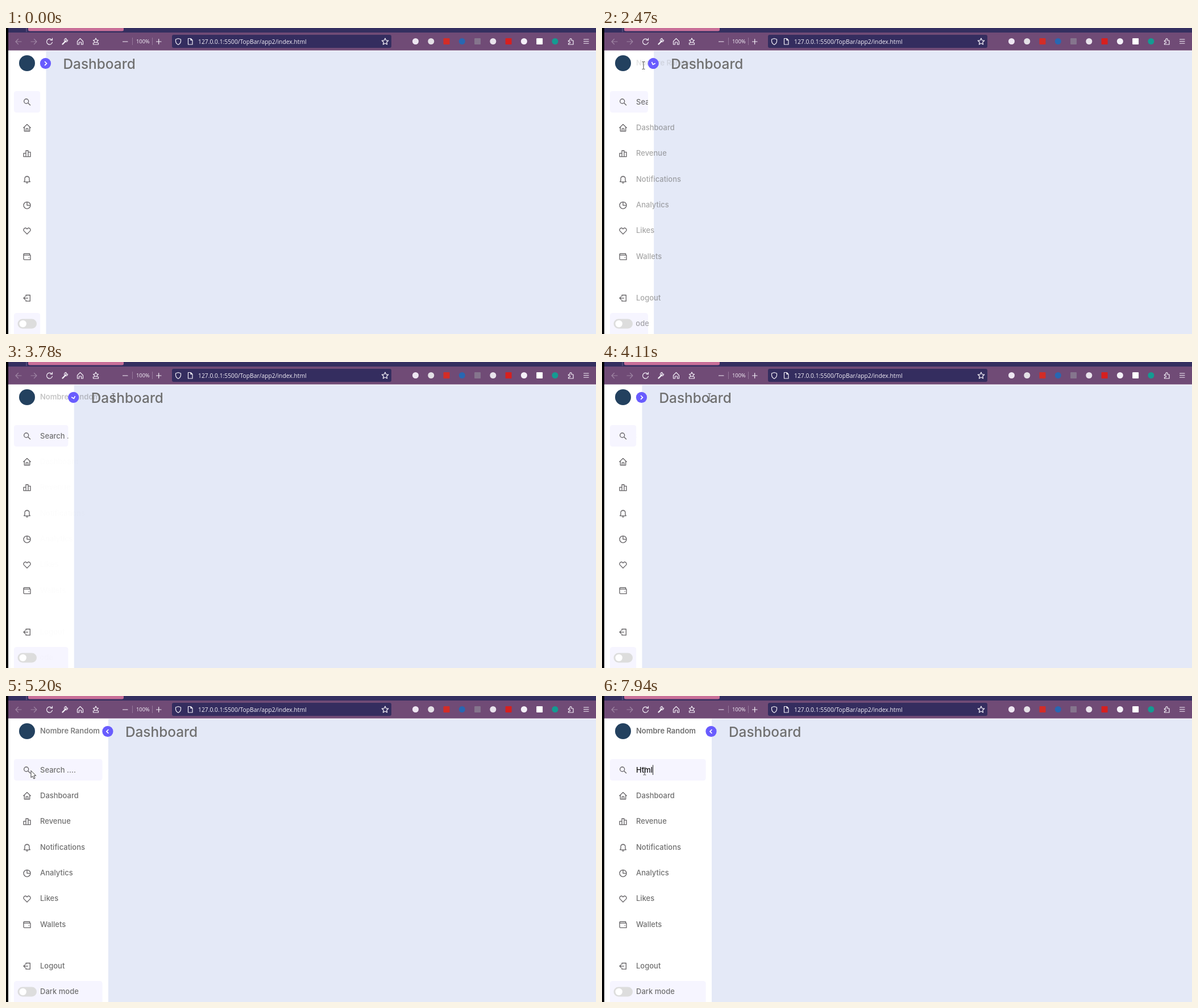
An HTML page that plays this animation: 1038 px wide and 539 px high, repeating every 8 s.

```html
<!DOCTYPE html>
<html lang="en">
<head>
<meta charset="utf-8">
<title>Collapsing sidebar</title>
<style>
  html, body { margin: 0; width: 100%; height: 100%; overflow: hidden; background: #e4e9f7; }
  svg { display: block; width: 100%; height: 100%; }
  text { font: 500 13px Inter, sans-serif; fill: #707070; white-space: pre; }
  .title { font-size: 24.4px; }
  .name { font-weight: 600; }
  .chrome text { font: 10.3px "Open Sans", sans-serif; fill: #f4f0f8; }
  .line { fill: none; stroke: #f4f0f8; stroke-width: 1.2; stroke-linecap: round; stroke-linejoin: round; }
  .dim { opacity: .35; }
  .icon { fill: none; stroke: #656366; stroke-width: 2; stroke-linejoin: round; }
  .box { fill: #f6f5ff; }
</style>
</head>
<body>
<svg viewBox="0 0 1038 539" preserveAspectRatio="none">
  <defs>
    <clipPath id="searchClip"><rect id="searchArea" x="60" y="111" height="38"/></clipPath>
    <clipPath id="modeClip"><rect x="59.5" y="502" width="200" height="37"/></clipPath>
  </defs>

  <rect y="39" width="1038" height="2" fill="#f5f6fc"/>
  <text id="title" class="title" y="71.5">Dashboard</text>

  <rect id="sidebar" x="4" y="39" height="500" fill="#fff"/>
  <rect id="searchBox" class="box" x="14" y="111" height="38" rx="4.5"/>
  <rect id="modeBox" class="box" x="14" y="502" height="45" rx="4.5"/>
  <circle cx="37" cy="62" r="14" fill="#23415f"/>
  <text id="name" class="name" x="60" y="66.3">Nombre Random</text>
  <g id="menu"></g>
  <g clip-path="url(#searchClip)">
    <text id="search" x="60" y="134.5"></text>
    <rect id="caret" y="121.5" width="1" height="17.5" fill="#222"/>
  </g>
  <g clip-path="url(#modeClip)"><text id="mode" y="524.8">Dark mode</text></g>
  <rect x="20.5" y="512.5" width="33.5" height="17" rx="8.5" fill="#ddd"/>
  <circle cx="29.7" cy="521" r="6.2" fill="#fff"/>
  <g id="toggle">
    <circle r="9.6" fill="#695cfe"/>
    <path d="M-1.4-3.4 2-0 -1.4 3.4" fill="none" stroke="#fff" stroke-width="1.7"/>
  </g>

  <g class="chrome">
    <rect width="1038" height="8" fill="#342f60"/>
    <path d="M39 0H207V3Q207 5.5 204 5.5H42Q39 5.5 39 3Z" fill="#c96f98"/>
    <path d="M36 0V7" stroke="#6a6590"/>
    <rect y="8" width="1038" height="31.5" fill="#704b76"/>
    <rect x="292" y="12" width="386" height="23" rx="3" fill="#342d5f"/>
    <g class="line dim">
      <path d="M27 24H17M21.500 19.500 17 24 21.500 28.500"/>
      <path d="M44 24H54M49.500 19.500 54 24 49.500 28.500"/>
    </g>
    <g class="line">
      <path d="M80.500 21A5 5 0 1 0 81.500 25M81.500 18V21.500H78"/>
      <path d="M99.500 28.500 105 23" stroke-width="2.4"/>
      <path d="M108.500 21A3 3 0 1 1 106 18.500L105.500 21.500Z"/>
      <path d="M125.500 23.500 130.500 18.500 135.500 23.500V29H132.500V25H128.500V29H125.500Z"/>
      <path d="M158 18 159.500 21 162.500 21.500 160.300 23.700 160.800 26 158 25 155.200 26 155.700 23.700 153.500 21.500 156.500 21ZM153.500 26V29H162.500V26"/>
      <path d="M205.500 24H214M264.500 24H273M268.700 19.700V28.300"/>
      <path d="M303 18.500 307.500 20V23Q307.500 27 303 29.500 298.500 27 298.500 23V20Z"/>
      <path d="M320.500 18.500H325L328 21.500V29H320.500ZM325 18.500V21.500H328"/>
      <path d="M667 18 668.700 21.800 672.700 22.200 669.700 25 670.600 29 667 27 663.400 29 664.300 25 661.300 22.200 665.300 21.800Z"/>
      <path d="M989.500 22H992V20A1.500 1.500 0 0 1 995 20V22H998V29H989.500V27H991A1.500 1.500 0 0 0 991 24H989.500Z"/>
      <path d="M1016.500 20H1025M1016.500 23.500H1025M1016.500 27H1025"/>
    </g>
    <path d="M222.500 17V30M257.500 17V30" stroke="#94779b"/>
    <text x="229" y="27.300" style="font-size:9.4px">100%</text>
    <text x="338" y="27.700">127.0.0.1:5500/TopBar/app2/index.html</text>
    <g id="addons"></g>
  </g>
  <rect width="4" height="539"/>

  <path id="arrow" d="M0 0V12.200L2.800 9.600 4.900 14.300 7 13.400 5 8.800H8.700Z" fill="#fff" stroke="#222" stroke-width=".9"/>
  <path id="beam" d="M-2.500-6.500H-.8L0-5.800.8-6.500H2.500M0-5.800V5.800M-2.500 6.500H-.8L0 5.800.8 6.500H2.500" fill="none" stroke="#4c4c4c"/>
</svg>
<script>
const LOOP = 8000;
const CLOSED = 70.5, OPEN = 193;
const $ = id => document.getElementById(id);
const set = (id, attrs) => {
  for (const key in attrs) $(id).setAttribute(key, attrs[key]);
};

// Icons use a 24-unit box.
const menuItems = [
  [130, '', 'M16 10A6 6 0 1 1 4 10 6 6 0 0 1 16 10M14.500 14.500 21 21'],
  [175.500, 'Dashboard', 'M2 12.500 12 3 22 12.500M5 10V21H19V10M9.500 21V14H14.500V21'],
  [221, 'Revenue', 'M3 11H9V20H3ZM9 4H15V20H9ZM15 8H21V20H15Z'],
  [266.500, 'Notifications', 'M4 18H20L18 15V10Q18 4 12 4T6 10V15ZM12 4V2M9.500 20Q12 23 14.500 20'],
  [312, 'Analytics', 'M12 3A9 9 0 1 0 21 12H12ZM12 3A9 9 0 0 1 21 12'],
  [357, 'Likes', 'M12 20.500 4 12.500C0 8 7 1 12 7C17 1 24 8 20 12.500Z'],
  [402.500, 'Wallets', 'M19 8V4H5Q3 4 3 6V18Q3 20 5 20H21V8H5Q3 8 3 6M16 14H18'],
  [475.500, 'Logout', 'M9 8V4H20V20H9V16M15 12H3M7 8 3 12 7 16']
];
$('menu').innerHTML = menuItems.map(([y, label, d]) =>
  `<path class="icon" d="${d}" transform="translate(29 ${y - 7.700}) scale(.667)"/>
   <text class="label" x="60" y="${y + 4}">${label}</text>`).join('');
const labels = [...document.querySelectorAll('.label'), $('mode')];

const addons = [
  ['circle', '#eee6f2'], ['circle', '#e4e0e6'], ['square', '#d32d27'],
  ['circle', '#2867b2'], ['square', '#85758d'], ['circle', '#e9e3ec'],
  ['square', '#d6201f'], ['circle', '#f4f0f8'], ['square', '#fff'], ['circle', '#149b92']
];
$('addons').innerHTML = addons.map(([shape, color], i) => {
  const radius = shape === 'circle' ? 5.500 : 1;
  return `<rect x="${715 + i * 27.270}" y="18" width="11" height="11" rx="${radius}" fill="${color}"/>`;
}).join('');

// The CSS "ease" curve: cubic-bezier(.25, .1, .25, 1).
function ease(x) {
  if (x <= 0) return 0;
  if (x >= 1) return 1;
  const bezier = (a, b, s) => 3 * a * s * (1 - s) ** 2 + 3 * b * s * s * (1 - s) + s ** 3;
  let low = 0, high = 1;
  for (let i = 0; i < 20; i++) {
    const mid = (low + high) / 2;
    if (bezier(.25, .25, mid) < x) low = mid; else high = mid;
  }
  return bezier(.1, 1, low);
}

const CLICKS = { open: 2400, close: 3608, reopen: 4895 };
function openness(t, duration) {
  if (t < CLICKS.close) return ease((t - CLICKS.open) / duration);
  if (t < CLICKS.reopen) return 1 - ease((t - CLICKS.close) / duration);
  return ease((t - CLICKS.reopen) / duration);
}

// time, x, y
const pointerPath = [
  [470, 974, 537], [1250, 336, 251], [1310, 334, 249], [1900, 55, 78], [2000, 62, 68],
  [2130, 68, 66], [2210, 71, 66], [2400, 71, 66], [2465, 73, 66], [2650, 73, 66],
  [3100, 191, 63], [3240, 191, 63], [3300, 192.500, 65], [3600, 191, 63], [3700, 189, 62],
  [4110, 189, 62], [4530, 44, 131.500], [5250, 44, 131.500], [5520, 74, 131],
  [5600, 74, 131], [5660, 76, 132], [5770, 76, 132], [5810, 75, 132.500], [LOOP, 75, 132.500]
];
function pointerAt(t) {
  const i = Math.max(1, pointerPath.findIndex(point => point[0] > t));
  const [t0, x0, y0] = pointerPath[i - 1], [t1, x1, y1] = pointerPath[i];
  const s = Math.max(0, (t - t0) / (t1 - t0)), k = s * s * (3 - 2 * s);
  return [x0 + (x1 - x0) * k, y0 + (y1 - y0) * k];
}
const between = (t, from, to) => t >= from && t < to;
const overText = t => between(t, 2400, 2960) || between(t, 3660, 4240) || t >= 5400;

const typing = [[7340, 'H'], [7670, 'Ht'], [7810, 'Htm'], [7900, 'Html']];

function drawSearch(t) {
  const typed = typing.filter(([start]) => t >= start).map(step => step[1]).pop();
  const search = $('search');
  search.textContent = typed || 'Search ....';
  search.style.fill = typed ? '#111' : '';
  const caretOn = between(t, 5660, 6190) || between(t, 6760, 7270) || !!typed;
  const textWidth = typed ? search.getComputedTextLength() : 0;
  set('caret', { x: 60 + textWidth, visibility: caretOn ? 'visible' : 'hidden' });
}

function draw(t) {
  const open = openness(t, 500), quick = openness(t, 200);
  const edge = CLOSED + (OPEN - CLOSED) * open;
  const boxWidth = edge - 24.300;
  const closing = between(t, CLICKS.close, CLICKS.reopen);

  set('sidebar', { width: edge - 4 });
  set('searchBox', { width: boxWidth });
  set('modeBox', { width: boxWidth });
  set('searchArea', { width: Math.max(0, boxWidth - 46) });
  set('title', { x: edge + 30 });
  set('name', { opacity: open });
  labels.forEach(label => label.setAttribute('opacity', quick));
  set('mode', { x: boxWidth < 113 ? 15 : 60 });
  const turn = 180 * (closing ? open : quick);
  set('toggle', { transform: `translate(${edge - 1} 62.400) rotate(${turn})` });
  drawSearch(t);

  const [x, y] = pointerAt(t), beam = overText(t);
  const transform = `translate(${x} ${y})`;
  set('arrow', { transform, visibility: t >= 480 && !beam ? 'visible' : 'hidden' });
  set('beam', { transform, visibility: beam ? 'visible' : 'hidden' });
}

const start = performance.now();
function tick(now) {
  draw(Math.max(0, now - start) % LOOP);
  requestAnimationFrame(tick);
}
draw(0);
requestAnimationFrame(tick);
</script>
</body>
</html>
```
